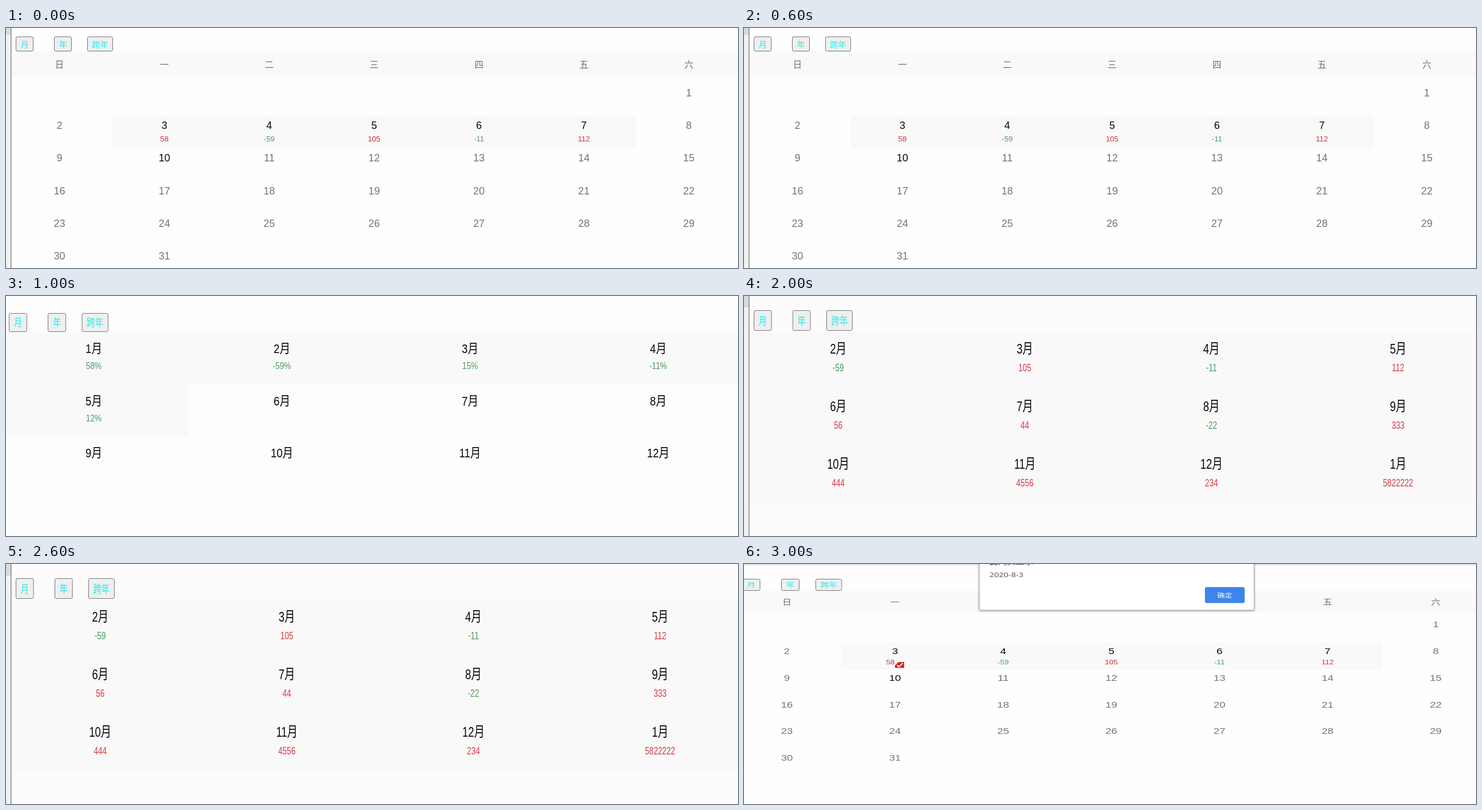
Animation of 1280 by 421 pixels, one loop 4000 ms. Source, as an HTML page with a canvas:

```html
<!DOCTYPE html>
<html lang="zh">
<head>
<meta charset="utf-8">
<title>Calendar</title>
<style>
  html, body { margin: 0; width: 100%; height: 100%; overflow: hidden; background: #fefefe; }
  canvas { display: block; width: 1280px; height: 421px; }
</style>
</head>
<body>
<canvas id="stage" width="1280" height="421"></canvas>
<script>
const ctx = document.getElementById('stage').getContext('2d');
const SANS = '"Liberation Sans", "Noto Sans CJK SC", sans-serif';
const UI = '"Noto Sans", "Noto Sans CJK SC", sans-serif';
const RED = '#c9353f', GREEN = '#4f9a60', GRAY = '#747474', BLACK = '#0a0a0a', BAND = '#f9f9f9';
const STEP = 1000;
let sx = 1, sy = 1;

function rect(x, y, w, h, color) {
  ctx.fillStyle = color;
  ctx.fillRect(x, y, w, h);
}

function page(color, scaleX, scaleY) {
  sx = scaleX;
  sy = scaleY;
  rect(0, 0, 1280, 421, color);
}

// y is the vertical middle of the capitals
function text(str, x, y, size, color, { align = 'center', font = SANS, weight = 400 } = {}) {
  ctx.save();
  ctx.translate(x, y);
  ctx.scale(sx, sy);
  ctx.font = `${weight} ${size}px ${font}`;
  ctx.textAlign = align;
  ctx.fillStyle = color;
  ctx.fillText(str, 0, size * 0.36);
  ctx.restore();
}

function roundBox(x, y, w, h, r, fill, stroke) {
  ctx.beginPath();
  ctx.roundRect(x, y, w, h, r);
  ctx.fillStyle = fill;
  ctx.fill();
  if (stroke) {
    ctx.strokeStyle = stroke;
    ctx.lineWidth = 1;
    ctx.stroke();
  }
}

function buttons(lefts, y, h) {
  ['月', '年', '跨年'].forEach((label, i) => {
    const w = (i === 2 ? 45 : 31) * sx;
    roundBox(lefts[i] + 0.5, y + 0.5, w - 1, h - 1, 2.5, '#efefef', '#767676');
    text(label, lefts[i] + w / 2, y + h / 2 + 0.5, 14.2, '#1ef0f2');
  });
}

function windowEdge(tabHeight) {
  rect(0, 0, 8, 421, '#f1f1ee');
  rect(0, 0, 8, tabHeight, '#d9d9d9');
  rect(8, 0, 1.5, 421, '#858585');
}

const valueColor = v => v < 0 ? GREEN : RED;

function monthGrid({ x0, dx, headY, firstY, dy, noteY, noteShift = 0 }) {
  const colX = i => x0 + dx * i;
  [...'日一二三四五六'].forEach((d, i) => text(d, colX(i), headY, 15.5, '#6c6c6c'));
  for (let day = 1; day <= 31; day++) {
    const cell = day + 5;
    const active = day >= 3 && day <= 7 || day === 10;
    text(String(day), colX(cell % 7), firstY + dy * Math.floor(cell / 7), 18, active ? BLACK : GRAY);
  }
  [58, -59, 105, -11, 112].forEach((v, i) =>
    text(String(v), colX(i + 1) - (i ? 0 : noteShift), noteY, 13.2, valueColor(v)));
}

function yearGrid({ x0, dx, y0, dy, gap, first, notes, color }) {
  for (let i = 0; i < 12; i++) {
    const x = x0 + dx * (i % 4);
    const y = y0 + dy * Math.floor(i / 4);
    text((first + i - 1) % 12 + 1 + '月', x, y, 18, BLACK);
    if (i < notes.length) text(String(notes[i]), x, y + gap, 13.3, color(notes[i]));
  }
}

function checkMark(x, y) {
  ctx.fillStyle = '#d91f1f';
  ctx.beginPath();
  ctx.moveTo(x, y + 10);
  ctx.lineTo(x, y + 6);
  ctx.lineTo(x + 6, y);
  ctx.lineTo(x + 16, y);
  ctx.lineTo(x + 16, y + 10);
  ctx.fill();
  ctx.strokeStyle = '#fff';
  ctx.lineWidth = 1.8;
  ctx.beginPath();
  ctx.moveTo(x + 3.5, y + 5.5);
  ctx.lineTo(x + 7, y + 8);
  ctx.lineTo(x + 13.5, y + 2);
  ctx.stroke();
}

function dialog() {
  ctx.save();
  ctx.shadowColor = 'rgba(0,0,0,.45)';
  ctx.shadowBlur = 4;
  ctx.shadowOffsetY = 1;
  roundBox(411.5, -20, 480.5, 101, 2, '#fff');
  ctx.restore();
  roundBox(411.5, -20, 480.5, 101, 2, '#fff', '#a8a8a8');
  text('此网页显示', 429, -3.5, 15, '#333', { align: 'left', font: UI });
  text('2020-8-3', 429, 18.5, 14.2, '#5a5a5a', { align: 'left', font: UI });
  roundBox(806, 40.5, 69.5, 28, 3.5, '#3c86ea');
  text('确定', 840.7, 55, 12.8, '#fff', { font: UI, weight: 500 });
}

function monthView() {
  page('#fefefe', 1, 1);
  rect(10, 41, 1270, 45, BAND);
  rect(186, 154, 916, 57, BAND);
  windowEdge(12);
  buttons([17, 84, 142], 15, 26);
  monthGrid({ x0: 93.5, dx: 183.4, headY: 64, firstY: 113.5, dy: 57.2, noteY: 194.5 });
}

function yearView() {
  page('#fdfdfd', 1.03, 1.27);
  rect(0, 64, 1280, 90, BAND);
  rect(0, 154, 318, 92, BAND);
  buttons([5, 73, 132.5], 30, 33);
  yearGrid({
    x0: 153.5, dx: 329, y0: 91.5, dy: 91.8, gap: 30.3, first: 1,
    notes: ['58%', '-59%', '15%', '-11%', '12%'], color: () => GREEN
  });
}

function crossYearView() {
  page('#fcfcfc', 1.02, 1.38);
  rect(10, 62, 1270, 301, BAND);
  windowEdge(20);
  buttons([17, 85, 144], 25, 36);
  yearGrid({
    x0: 164.8, dx: 326.3, y0: 92.5, dy: 101, gap: 33.3, first: 2,
    notes: [-59, 105, -11, 112, 56, 44, -22, 333, 444, 4556, 234, 5822222],
    color: v => v < 0 ? GREEN : '#d83a46'
  });
}

function alertView() {
  page('#fefefe', 1.032, 0.817);
  rect(0, 0, 1280, 2, '#dedede');
  rect(0, 47, 1280, 37, BAND);
  rect(170, 139, 946, 46, BAND);
  buttons([-3.5, 65, 125], 26, 21);
  monthGrid({ x0: 75, dx: 189.1, headY: 66, firstY: 106, dy: 46.75, noteY: 172.3, noteShift: 8 });
  checkMark(264, 172);
  dialog();
}

const views = [monthView, yearView, crossYearView, alertView];
const start = performance.now();

function frame(now) {
  const t = Math.max(0, now - start) % (STEP * views.length);
  views[Math.floor(t / STEP)]();
  requestAnimationFrame(frame);
}
frame(start);
</script>
</body>
</html>
```
